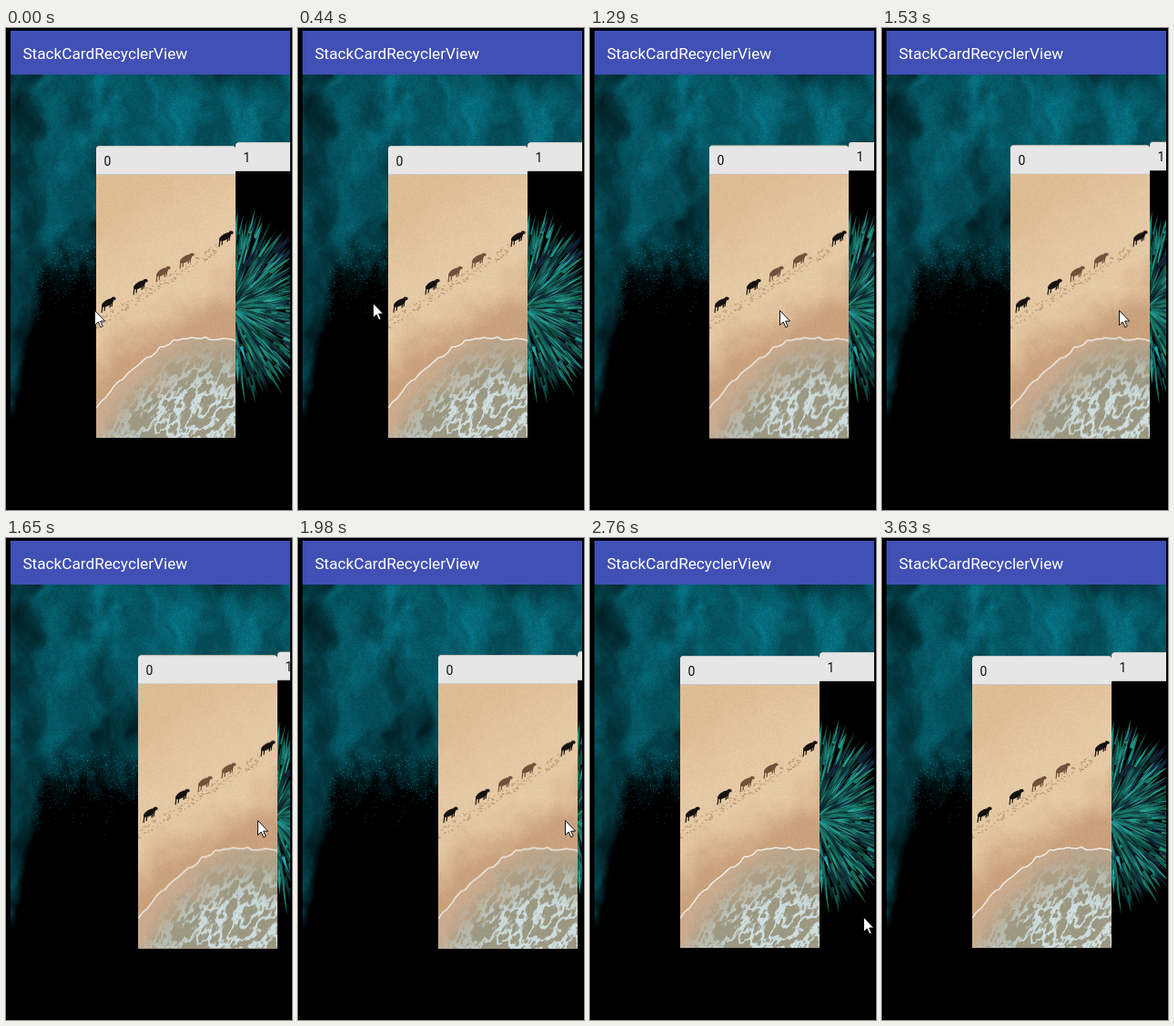
An HTML page with a canvas for the animation above (3.7 s loop, 314 by 528 pixels).

```html
<!DOCTYPE html>
<html lang="en">
<head>
<meta charset="utf-8">
<title>StackCardRecyclerView</title>
<style>
html, body { margin: 0; width: 314px; height: 528px; overflow: hidden; background: #000; }
body { position: relative; font-family: Roboto, sans-serif; }
#app { position: absolute; left: 5px; top: 0; width: 307px; height: 528px; overflow: hidden; }
#bar { position: absolute; top: 3px; width: 307px; height: 48px; background: #4050b5; }
#bar span { position: absolute; left: 13.4px; top: 14px; font: 400 17.2px/22px Roboto, sans-serif; color: #fff; white-space: nowrap; }
#smoke { position: absolute; left: 0; top: 51px; }
.card { position: absolute; left: 0; top: 0; width: 153px; border-radius: 4px 4px 0 0; overflow: hidden; transform-origin: 0 0; }
.card div { box-sizing: border-box; height: 32px; padding-left: 8.5px; font-size: 14px; line-height: 33px;
  color: #111; background: #e6e6e6; border: solid #c4c4c4; border-width: 1px 0; border-radius: 3px 3px 0 0; }
.card canvas { display: block; }
#card0 { background: #dcbb95; }
#card1 { background: #000; }
#cursor { position: absolute; left: 0; top: 0; overflow: visible; }
</style>
</head>
<body>
<div id="app">
  <canvas id="smoke" width="307" height="400"></canvas>
  <div id="bar"><span>StackCardRecyclerView</span></div>
  <div class="card" id="card1"><div>1</div><canvas id="ball" width="153" height="295"></canvas></div>
  <div class="card" id="card0"><div>0</div><canvas id="beach" width="153" height="288"></canvas></div>
  <svg id="cursor" width="13" height="20"><path d="M.5 .5V16.5L4.2 13 6.8 18.8 9.2 17.7 6.6 12.1H11.6Z" fill="#fff" stroke="#111"/></svg>
</div>
<script>
const LOOP = 3700;
const $ = id => document.getElementById(id);
const clamp = (v, a = 0, b = 1) => Math.max(a, Math.min(b, v));
const mix = (a, b, k) => a + (b - a) * k;
const ramp = (a, b, v) => clamp((v - a) / (b - a));
const smooth = (a, b, v) => { const k = ramp(a, b, v); return k * k * (3 - 2 * k); };
const mixColor = (a, b, k) => a.map((c, i) => mix(c, b[i], k));

function hash(x, y) {
  const n = Math.sin(x * 127.1 + y * 311.7) * 43758.5453;
  return n - Math.floor(n);
}
function noise(x, y) {
  const i = Math.floor(x), j = Math.floor(y);
  const u = smooth(0, 1, x - i), v = smooth(0, 1, y - j);
  return mix(mix(hash(i, j), hash(i + 1, j), u), mix(hash(i, j + 1), hash(i + 1, j + 1), u), v);
}
function fbm(x, y) {
  let sum = 0, amp = .52;
  for (let k = 0; k < 4; k++, amp /= 2) sum += amp * noise(x * 2 ** k + k * 17, y * 2 ** k + k * 31);
  return sum;
}
let seed = 7;
const rand = (a = 0, b = 1) => {
  seed = (seed * 16807) % 2147483647;
  return mix(a, b, seed / 2147483647);
};

function paint(id, shade) {
  const g = $(id).getContext('2d'), { width: w, height: h } = g.canvas;
  const img = g.createImageData(w, h);
  for (let y = 0; y < h; y++)
    for (let x = 0; x < w; x++) img.data.set([...shade(x, y), 255], (y * w + x) * 4);
  g.putImageData(img, 0, 0);
  return g;
}

// Teal powder cloud, hanging lowest at the left
function drawSmoke() {
  paint('smoke', (x, y) => {
    const warp = fbm(x / 30 + 9, y / 30) * 30;
    const n = fbm((x + warp) / 30, (y + warp) / 60);
    const edge = 228 + 145 * Math.exp(-((x / 22) ** 2));
    const d = edge - y + (fbm(x / 10, y / 18 + 40) - .5) * 50;
    let v = clamp(.5 + .85 * (n - .5), .2, .9) * smooth(-12, 45, d) * mix(1, .65, smooth(210, 340, y));
    v *= .9 + .2 * hash(x, y);
    if (x > 25 && d < 40 && hash(y, x + 3) < .07 * smooth(-45, 25, d)) v += .3;
    return [8 * v, 146 * v, 168 * v];
  });
}

// Beach seen from above
const shore = x => 177 + 78 * Math.max(0, 1 - x / 105) ** 1.6 + Math.max(0, x - 105) * .08;

function drawBeach() {
  const g = paint('beach', (x, y) => {
    const n = fbm(x / 26, y / 26), u = y + x * .55 + (n - .5) * 50;
    let c = mixColor([222, 189, 149], [229, 201, 164], smooth(40, 135, u));
    c = mixColor(c, [201, 162, 125], smooth(165, 235, u));
    const d = y - shore(x);
    if (d > 0) {
      c = mixColor([203, 171, 141], [156, 152, 130], smooth(5, 75, d + x * .16 + (n - .5) * 40));
      const ridge = 1 - Math.abs(2 * fbm((x + y * .5) / 8, (y - x * .2) / 13 + 5) - 1);
      const strength = smooth(6, 70, d + (n - .5) * 30) * (.6 + .4 * smooth(30, 80, x));
      c = mixColor(c, [206, 222, 224], smooth(.74, .92, ridge) * strength);
    }
    const grain = (hash(x, y) - .5) * 9;
    return c.map(v => v + grain);
  });

  g.lineWidth = 1.5;
  g.strokeStyle = '#eeebe6';
  g.beginPath();
  for (let x = 0; x <= 154; x += 2) g.lineTo(x, shore(x) + (noise(x / 5, 3) - .5) * 4);
  g.stroke();

  g.fillStyle = 'rgba(157,119,86,.65)';
  for (let i = 0; i < 150; i++) {
    const x = rand(0, 136);
    g.fillRect(x, 162 - .62 * x + rand(-5, 6), rand(1, 2.2), 1);
  }
  [13, 48, 73, 99, 142].forEach((x, i) => drawCow(g, x, 147 - .56 * x, i == 2 || i == 3 ? '#72503a' : '#15110f'));
}

function drawCow(g, x, y, color) {
  g.save();
  g.translate(x, y);
  g.fillStyle = g.strokeStyle = color;
  g.lineWidth = 1.2;
  g.beginPath();
  for (const lx of [-6, -3, 3, 5]) { g.moveTo(lx, -lx * .5); g.lineTo(lx - 1, 7.5 - lx * .6); }
  g.stroke();
  g.rotate(-.55);
  g.beginPath();
  g.ellipse(-.5, 0, 7.5, 3.3, 0, 0, 7);
  g.ellipse(7.5, -.5, 2.6, 1.8, .5, 0, 7);
  g.fill();
  g.restore();
}

// Ball of spikes, cut by the left side of its card
function drawBall() {
  const g = $('ball').getContext('2d'), count = 650;
  g.translate(-6, 149);
  for (let i = 0; i < count; i++) {
    const r = mix(115, 30, i / count) * rand(.87, 1), len = rand(18, 40), half = rand(1.2, 2.4);
    const navy = rand() < .2;
    g.save();
    g.rotate(rand(-1.65, 1.65));
    g.fillStyle = navy ? `hsl(215,50%,${rand(9, 20)}%)` : `hsl(${rand(164, 180)},${rand(55, 72)}%,${rand(9, 40)}%)`;
    g.beginPath();
    g.moveTo(r, rand(-3, 3));
    g.lineTo(r - len, -half);
    g.lineTo(r - len, half);
    g.fill();
    g.restore();
  }
}

function place(id, x, top, bottom, height) {
  $(id).style.transform = `translate(${x}px,${top}px) scaleY(${(bottom - top) / height})`;
}

function frame(now) {
  const t = now % LOOP;
  const drag = ramp(930, 1980, t), back = smooth(2040, 2550, t);
  const nudge = smooth(90, 600, t), leave = smooth(2760, 3080, t);

  // The cards resist the pull, then spring back
  const k = Math.sqrt(drag) * (1 - back), dx = Math.round(55 * k);
  place('card0', 94 + dx, 129 - k, 449 + k, 320);
  place('card1', 247 + dx, 125 - k, 452 + k, 327);

  const x = 92 - 20 * nudge + 216 * (1 - (1 - drag) ** 2.2) + 7 * back - 2 * leave;
  const y = 309 - 11 * nudge + 11 * smooth(930, 1150, t) + 106 * back + 113 * leave;
  $('cursor').style.transform = `translate(${Math.round(x)}px,${Math.round(y)}px)`;
  requestAnimationFrame(frame);
}

drawSmoke();
drawBeach();
drawBall();
requestAnimationFrame(frame);
</script>
</body>
</html>
```
